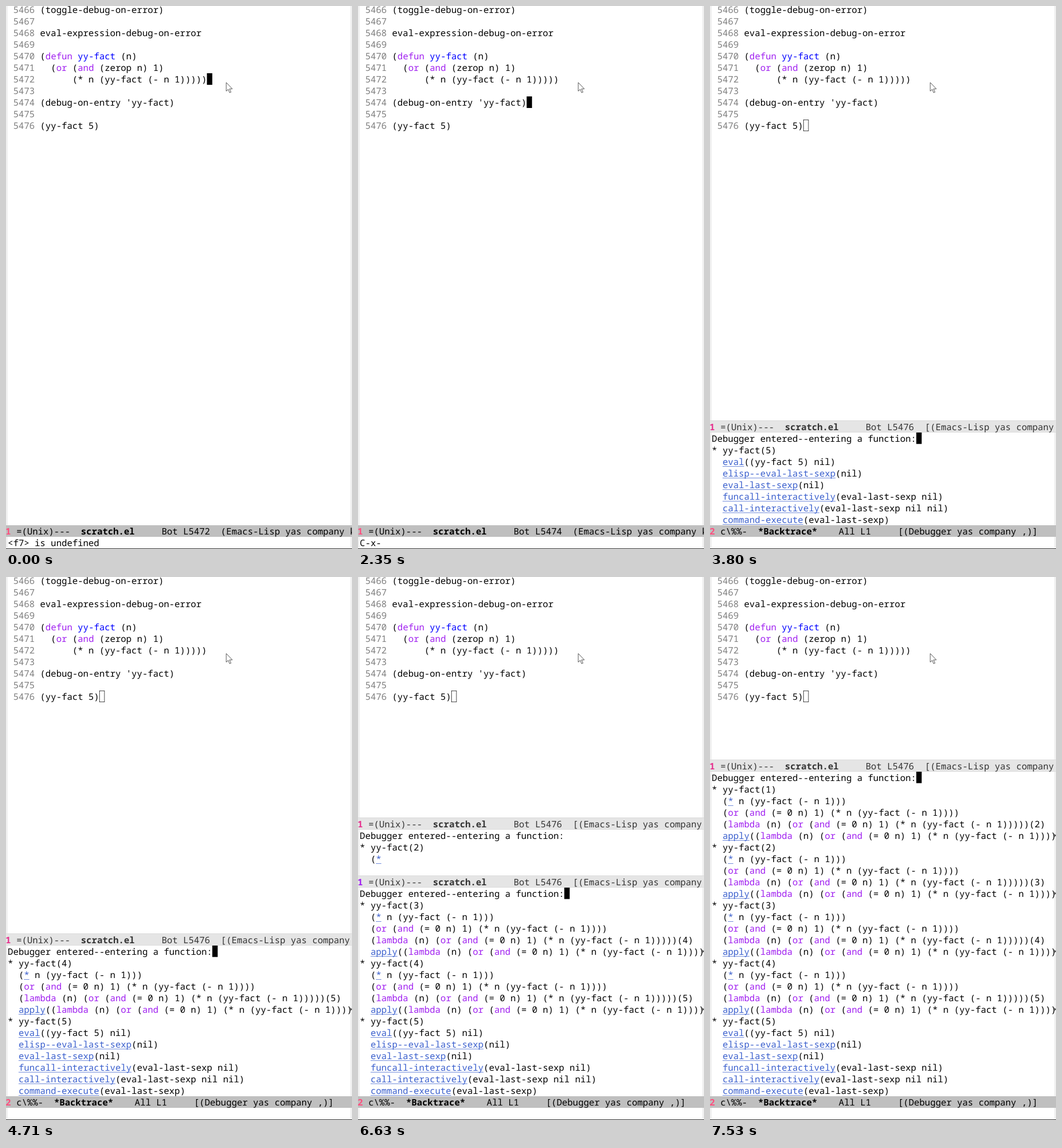
These frames come from a looping animation (597 px wide and 937 px high, 8000 ms). An HTML page:

```html
<!DOCTYPE html>
<html lang="en">
<head>
<meta charset="utf-8">
<title>Stepping through a recursive function</title>
<style>
  html, body { margin: 0; width: 100%; height: 100%; overflow: hidden; background: #fff; }
  #stage {
    position: relative; width: 597px; height: 937px; overflow: hidden; background: #fff;
    font: 15.476px/20px "Noto Sans Mono", monospace;
    text-rendering: geometricPrecision; font-kerning: none; font-variant-ligatures: none;
    color: #000;
  }
  #stage div, #stage svg { position: absolute; }
  .line { left: 3.1px; width: 590.9px; height: 20px; overflow: hidden; white-space: pre; }
  .pane { left: 0; width: 597px; overflow: hidden; background: #fff; }
  .fringe { top: 0; width: 3px; height: 100%; background: #f0f0f0; }
  .fringe.right { left: 594px; }
  .mode { left: 0; width: 597px; height: 20px; overflow: hidden; white-space: pre; text-indent: -.7px; background: #bfbfbf; }
  .mode.idle { height: 21px; line-height: 22px; background: #e5e5e5; color: #333; box-shadow: inset 0 1px #dcdcdc, inset 0 -1px #dcdcdc; }
  .num { color: #ff4f7f; }
  .idle .num { color: #e6338f; }
  .idle .violet { color: #a020f0; }
  .layer { left: 0; top: 0; }
  .hollow { fill: none; stroke: #000; stroke-width: .7; }
  .no { color: #7f7f7f; }
  .kw { color: #a020f0; }
  .fn { color: #00f; }
  u { color: #3a5fcd; text-decoration: underline 1px #3a5fcdb3; text-underline-offset: 2px; text-decoration-skip-ink: none; }
  .more { left: 594px; width: 3px; height: 6px; }
  #echo { top: 916px; }
  #edge { top: 936px; left: 0; width: 597px; height: 1px; background: #333; }
</style>
</head>
<body>
<div id="stage">
  <div id="buffer" class="pane" style="top:0;height:937px"></div>
  <div id="cursor"></div>
  <svg style="left:379px;top:131px" width="14" height="21" viewBox="0 0 14 21">
    <path d="M1 1V16L4.4 12.8L6.9 18.6L9.2 17.6L6.7 12H11.5Z" fill="#fff" stroke="#444" stroke-width=".9"/>
  </svg>
  <div id="windows"></div>
  <div id="status" class="mode" style="top:896px"></div>
  <div id="echo" class="line"></div>
  <div id="edge"></div>
</div>
<script>
const $ = id => document.getElementById(id);
const LOOP = 8000, ROW = 20, CELL = 65 / 7, LEFT = 3.1;

const code = [
  "(toggle-debug-on-error)", "", "eval-expression-debug-on-error", "",
  "(defun yy-fact (n)", "  (or (and (zerop n) 1)", "      (* n (yy-fact (- n 1)))))", "",
  "(debug-on-entry 'yy-fact)", "", "(yy-fact 5)"
];

const bottomCalls = [
  "* yy-fact(5)", "  eval((yy-fact 5) nil)", "  elisp--eval-last-sexp(nil)",
  "  eval-last-sexp(nil)", "  funcall-interactively(eval-last-sexp nil)",
  "  call-interactively(eval-last-sexp nil nil)", "  command-execute(eval-last-sexp)"
];

// [start, changes]; "n" is the innermost argument, "next" a half-drawn call
const steps = [
  [0, { row: 6, col: 37, msg: "<f7> is undefined", n: 0, next: 0 }],
  [750, { msg: "" }],
  [890, { msg: "C-x-" }],
  [1310, { msg: "yy-fact" }],
  [1870, { row: 7, col: 6, msg: "" }],
  [2010, { row: 8, col: 31 }],
  [2350, { msg: "C-x-" }],
  [2550, { msg: "yy-fact" }],
  [2970, { row: 9, col: 6, msg: "" }],
  [3250, { row: 10, col: 17 }],
  [3590, { msg: "C-x-" }],
  [3800, { msg: "", n: 5 }],
  [4640, { next: 4 }],
  [4710, { n: 4, next: 0 }],
  [5530, { next: 3 }],
  [5600, { n: 3, next: 0 }],
  [6630, { next: 2 }],
  [6700, { n: 2, next: 0 }],
  [7330, { next: 1 }],
  [7400, { n: 1, next: 0 }]
];

const paint = s => s
  .replace(/^  ([a-z-]+)(?=\()/, "  <u>$1</u>")
  .replace(/^  \(\*/, "  (<u>*</u>")
  .replace(/\((defun) (\S+)/, '(<span class="kw">$1</span> <span class="fn">$2</span>')
  .replace(/\((or|and|lambda)\b/g, '(<span class="kw">$1</span>');

const line = (html, y) => `<div class="line" style="top:${y}px">${html}</div>`;
const fringes = '<div class="fringe"></div><div class="fringe right"></div>';
const more = y => `<svg class="more" style="top:${y + 7}px" viewBox="0 0 3 6">` +
  '<path d="M0 .4L2.4 3L0 5.6M0 3H3" fill="none" stroke="#222"/></svg>';

// SVG keeps the cursor on fractional cell edges
function cursorBox(col, y, hollow) {
  const inset = hollow ? .35 : 0;
  return '<svg class="layer" width="597" height="937">' +
    `<rect class="${hollow ? "hollow" : ""}" x="${LEFT + col * CELL + inset}" y="${y + inset}" ` +
    `width="${CELL - 2 * inset}" height="${ROW - 2 * inset}"/></svg>`;
}

const scratchMode = (row, tail, tint = "") =>
  `<b class="num ${tint}">1</b> =(Unix)---  <b>scratch.el</b>     Bot L${5466 + row}  ${tail}`;
const debugMode = '<b class="num">2</b> c\\%%-  <b>*Backtrace*</b>    All L1     [(Debugger yas company ,)]';

const call = n => {
  const mul = "(* n (yy-fact (- n 1)))";
  const body = `(or (and (= 0 n) 1) ${mul})`;
  const fun = `(lambda (n) ${body})`;
  return [`* yy-fact(${n})`, "  " + mul, "  " + body, `  ${fun}(${n + 1})`, `  apply(${fun} ${n + 1})`];
};

function debugPane(n, partial) {
  const top = 715 - 100 * (5 - n);
  const rows = ["Debugger entered--entering a function:"];
  if (partial) rows.push(`* yy-fact(${n})`, "  (*");
  else {
    for (let k = n; k < 5; k++) rows.push(...call(k));
    rows.push(...bottomCalls);
  }
  const body = rows.map((s, i) => {
    const y = 21 + i * ROW;
    return line(paint(s), y) + (s.startsWith("  apply") ? more(y) : "");
  }).join("");
  const tint = n === 3 ? "violet" : "";
  return `<div class="pane" style="top:${top}px;height:${partial ? 100 : 896 - top}px">` +
    fringes + body + (partial ? "" : cursorBox(38, 20.7)) +
    `<div class="mode idle" style="top:0">${scratchMode(10, "[(Emacs-Lisp yas company", tint)}</div></div>`;
}

function show({ row, col, msg, n, next }) {
  $("cursor").innerHTML = cursorBox(col, row * ROW - 4, n > 0);
  $("windows").innerHTML = (n ? debugPane(n) : "") + (next ? debugPane(next, true) : "");
  $("status").innerHTML = n ? debugMode : scratchMode(row, "(Emacs-Lisp yas company k");
  $("echo").textContent = msg;
}

$("buffer").innerHTML = fringes + code.map((s, i) =>
  line(`<span class="no"> ${5466 + i} </span>${paint(s)}`, i * ROW - 4)).join("");

let state = {};
const states = steps.map(([, change]) => state = { ...state, ...change });
let shown = -1;
const start = performance.now();

function tick() {
  const t = (performance.now() - start) % LOOP;
  const i = steps.findLastIndex(([from]) => from <= t);
  if (i !== shown) show(states[shown = i]);
  requestAnimationFrame(tick);
}
tick();
</script>
</body>
</html>
```
